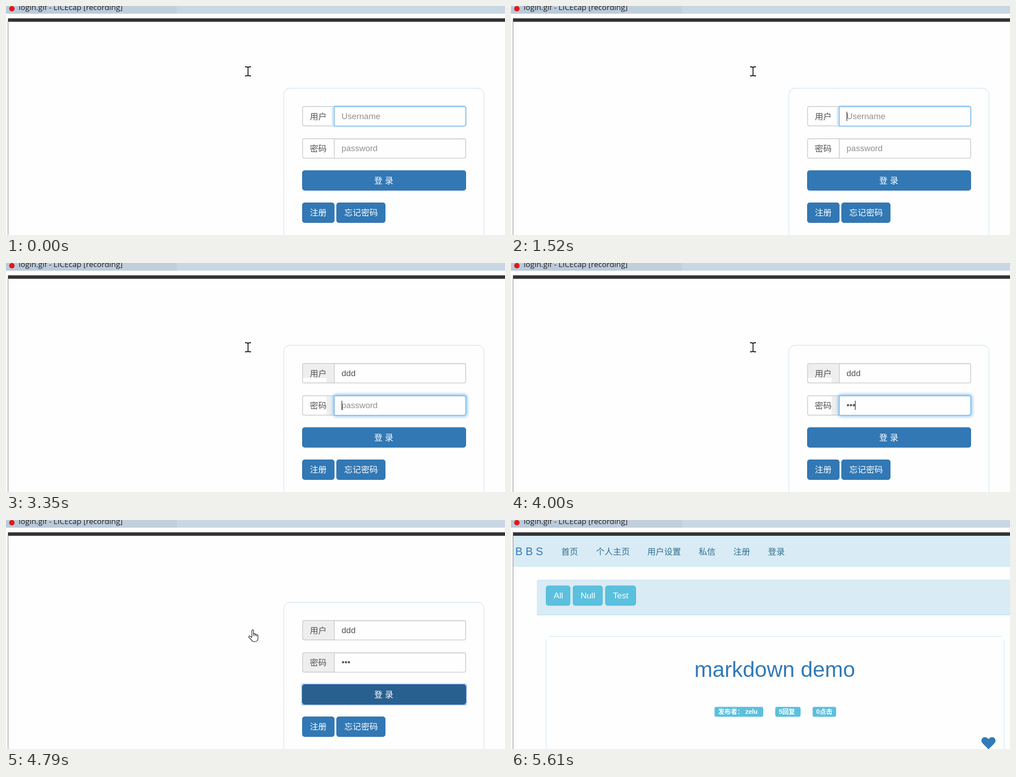
These frames come from a looping animation (1102x508 px, 7.93 s). An HTML page:

```html
<!DOCTYPE html>
<html lang="zh">
<head>
<meta charset="utf-8">
<title>Login</title>
<style>
  html, body { margin: 0; width: 100%; height: 100%; overflow: hidden; background: #fefefe; }
  svg { display: block; width: 1102px; height: 508px; }
  text { font: 18.6px "Liberation Sans", "Noto Sans CJK SC", "Noto Sans CJK", sans-serif; white-space: pre; }
  .title { font: 17px "Open Sans", sans-serif; fill: #222; }
  .label { fill: #555; }
  .white { fill: #fff; }
  .brand { font-size: 24px; fill: #337ab7; }
  .nav { fill: #31708f; }
  .headline { font-size: 48px; fill: #337ab7; }
  .badge { font-size: 14px; font-weight: bold; fill: #fff; }
  .field { stroke-width: 1.4; }
  .primary { fill: #3178b5; stroke: #2e6da4; }
  .info { fill: #5bc0de; stroke: #46b8da; }
  .cursor { stroke: #111; stroke-width: 1.2; stroke-linejoin: round; fill: #fff; }
</style>
</head>
<body>
<svg viewBox="0 0 1102 508">
  <defs>
    <filter id="soft" x="-10%" y="-50%" width="120%" height="200%"><feGaussianBlur stdDeviation="3"/></filter>
  </defs>

  <g id="login">
    <rect x="613.5" y="182.5" width="442" height="360" rx="14" fill="none" stroke="#cfe5ef" stroke-width="1.3"/>
    <path id="shade" fill="#eee"/>
    <g fill="none" stroke="#c4c4c4" class="field">
      <path d="M725 223H659q-4 0-4 4v35q0 4 4 4h66"/>
      <path d="M725 294.5H659q-4 0-4 4v35q0 4 4 4h66"/>
    </g>
    <text class="label" x="671" y="251.5">用户</text>
    <text class="label" x="671" y="323">密码</text>

    <rect id="userGlow" x="719.5" y="220" width="298" height="49" rx="8" fill="#d3e8f8"/>
    <rect id="passGlow" x="722" y="291" width="297" height="50" rx="7" fill="#66afe9" opacity=".7" filter="url(#soft)"/>
    <path id="userBox" class="field" fill="#fefefe" d="M725 223h286q4.300 0 4.300 4.300v34.500q0 4.300-4.300 4.300H725z"/>
    <path id="passBox" class="field" fill="#fefefe" d="M725 294.500h286q4.300 0 4.300 4.300v34.500q0 4.300-4.300 4.300H725z"/>
    <path d="M726.500 224.700h284M726.500 296.200h284" stroke="#000" stroke-opacity=".06" stroke-width="1.500"/>
    <text id="user" x="741" y="251"></text>
    <text id="pass" x="741" y="322.300"></text>
    <path id="caret" stroke="#333" stroke-width="1.400"/>

    <rect id="submit" x="654.500" y="365" width="361" height="44" rx="5" class="primary"/>
    <rect id="outline" x="653.500" y="364" width="363" height="46" rx="2" fill="none" stroke="#6b9fe8" stroke-width="1.400"/>
    <text class="white" x="813" y="394">登 录</text>
    <rect x="654.500" y="436.500" width="70.500" height="44" rx="5" class="primary"/>
    <text class="white" x="671" y="465">注册</text>
    <rect x="730" y="436.500" width="107.500" height="44" rx="5" class="primary"/>
    <text class="white" x="747" y="465">忘记密码</text>
  </g>

  <g id="home">
    <path fill="#d9ebf5" d="M5 35H1102V104H5zM57 211V137q0-5 5-5H1102V211z"/>
    <path d="M57 210.500H1102" stroke="#b8e4f0" stroke-width="1.600"/>
    <text class="brand" x="9.500" y="77.500">B B S</text>
    <g id="menu"></g>
    <g id="filters"></g>
    <path d="M85 258.300H1085M77.500 265V508M1089.500 265V508" fill="none" stroke="#d6ebf4" stroke-width="1.500"/>
    <text class="headline" x="405" y="348">markdown demo</text>
    <g id="badges"></g>
    <path fill="#337ab7" d="M1054.500 508.500L1042 496C1033 486 1046 475.500 1054.500 486C1063 475.500 1076 486 1067 496z"/>
  </g>

  <path d="M0 0H1102V17H0z" fill="#c9d6e4"/>
  <path d="M0 0H377V17H0z" fill="#c1cedc"/>
  <path d="M0 0H236V17H0z" fill="#bbcada"/>
  <circle cx="13" cy="6" r="6" fill="#e01818"/>
  <text class="title" x="28" y="8.500">login.gif - LICEcap [recording]</text>
  <path d="M4 28H1102V35H4z" fill="#333"/>
  <path d="M4.500 508V27.500H1102" fill="none" stroke="#777"/>

  <g id="beam"><path d="M0 1H4.500L6.500 2.500L8.500 1H13M6.500 2V20M0 21H4.500L6.500 19.500L8.500 21H13" fill="none" stroke="#000" stroke-width="1.800"/></g>
  <g id="hand" class="cursor">
    <path d="M8 17V2.500Q8 .7 9.800 .7T11.700 2.500V10Q12 8.800 13.700 9T15.300 11Q15.700 9.700 17 10T18.500 12Q21.500 11 21.500 14V19Q21.500 27 14 27Q9 27 7 23L1.500 17.500Q.3 15.800 2 14.700Q3.500 14 5 15.500L8 18"/>
    <path d="M11.700 10V14M15.300 11V14.500M18.500 12V15" fill="none"/>
  </g>
  <g id="arrow" class="cursor"><path d="M.7 .7V20.500L5.200 16.200L8.700 24.500L11.800 23.200L8.300 15.200H14.800z"/></g>
</svg>

<script>
const LOOP = 7930;
const $ = id => document.getElementById(id);

const text = (cls, x, y, str) => `<text class="${cls}" x="${x}" y="${y}">${str}</text>`;
const box = (x, y, w, h, r, attrs) => `<rect x="${x}" y="${y}" width="${w}" height="${h}" rx="${r}" ${attrs}/>`;

$('menu').innerHTML = [[111, '首页'], [188, '个人主页'], [301, '用户设置'], [414.5, '私信'], [491, '注册'], [567.5, '登录']]
  .map(([x, str]) => text('nav', x, 76.5, str)).join('');
$('filters').innerHTML = [[77.5, 53, 'All'], [137, 65, 'Null'], [208.5, 67, 'Test']]
  .map(([x, w, str]) => box(x, 146, w, 43.5, 5, 'class="info"') + text('white', x + 16.8, 173.7, str)).join('');
$('badges').innerHTML = [[449.5, 107.5, '发布者： zelu'], [583.5, 56, '5回复'], [666, 52, '0点击']]
  .map(([x, w, str]) => box(x, 414.5, w, 22, 4, 'fill="#5bc0de"') + text('badge', x + 8, 430, str)).join('');

const SHADES = [
  '',
  'M656 224H719V255H656z',
  'M656 224H708V255H656zM708 224H724V265.500H708zM708 295.500H724V337H708z',
  'M656 224H724V265.500H656zM656 295.500H724V337H656z'
];

// Each step overrides part of the state before it.
const steps = [
  [0, { page: 'login', focus: 'user', user: '', pass: '', caret: 0, shade: 0, hover: false, cursor: ['beam', 528, 134] }],
  [560, { caret: 741.7 }],
  [1120, { caret: 0 }],
  [1520, { caret: 741.7 }],
  [2040, { user: 'd', caret: 751.5 }],
  [2350, { user: 'dd', caret: 760.7 }],
  [2750, { user: 'ddd', caret: 771.3 }],
  [2900, { cursor: ['beam', 534, 173] }],
  [3050, { cursor: ['beam', 527, 169] }],
  [3200, { cursor: ['beam', 528, 176], caret: 0, shade: 1 }],
  [3350, { focus: 'pass', caret: 741.7, shade: 2 }],
  [3470, { pass: '•', caret: 747.3 }],
  [3720, { pass: '••', caret: 753.7 }],
  [4000, { pass: '•••', caret: 760.3 }],
  [4280, { cursor: ['hand', 523, 232], hover: true, shade: 3 }],
  [4400, { cursor: ['hand', 523, 237] }],
  [4520, { cursor: ['hand', 523, 240], focus: 'submit', caret: 0 }],
  [4790, { cursor: ['hand', 535, 243] }],
  [4940, { page: 'home', cursor: ['arrow', 682, 303.5] }],
  [5090, { cursor: ['arrow', 680, 305] }],
  [5370, { cursor: ['arrow', 816, 379] }],
  [5490, { cursor: ['arrow', 985, 468] }],
  [5610, { cursor: ['none', 0, 0] }]
];
let merged = {};
const states = steps.map(([time, change]) => ({ time, ...(merged = { ...merged, ...change }) }));

const show = (id, on) => { $(id).style.display = on ? '' : 'none'; };

function setField(id, value, placeholder, focused) {
  $(id).textContent = value || placeholder;
  $(id).setAttribute('fill', value ? '#555' : '#919191');
  $(id + 'Box').setAttribute('stroke', focused ? '#66afe9' : '#c2c2c2');
  show(id + 'Glow', focused);
}

function draw(s) {
  show('login', s.page === 'login');
  show('home', s.page === 'home');
  setField('user', s.user, 'Username', s.focus === 'user');
  setField('pass', s.pass, 'password', s.focus === 'pass');
  $('shade').setAttribute('d', SHADES[s.shade]);
  $('caret').setAttribute('d', s.caret ? `M${s.caret} ${s.focus === 'user' ? 234.5 : 305.5}v20.500` : '');
  $('submit').style.fill = s.hover ? '#286090' : '';
  $('submit').style.stroke = s.hover ? '#204d74' : '';
  show('outline', s.focus === 'submit');
  const [kind, x, y] = s.cursor;
  for (const id of ['beam', 'hand', 'arrow']) show(id, id === kind);
  if (kind !== 'none') $(kind).setAttribute('transform', `translate(${x} ${y})`);
}

let current;
function tick() {
  const now = performance.now() % LOOP;
  const next = states.findLast(s => s.time <= now);
  if (next !== current) draw(current = next);
  requestAnimationFrame(tick);
}
tick();
</script>
</body>
</html>
```
